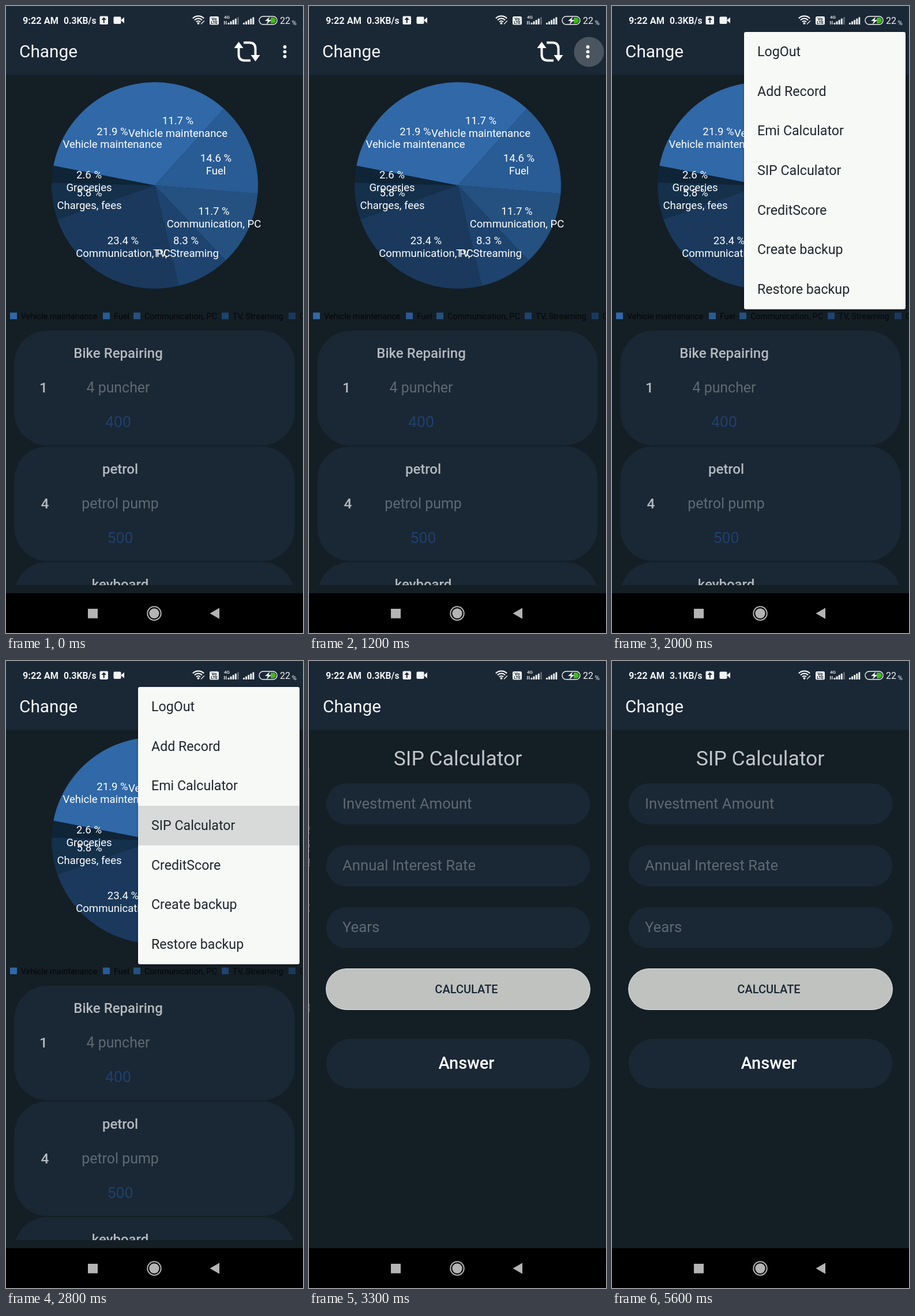
These frames come from a looping animation (515x1087 px, 5800 ms). An HTML page with a canvas:

```html
<!DOCTYPE html>
<html lang="en">
<head>
<meta charset="utf-8">
<title>Calculator menu</title>
<style>
html, body { margin: 0; width: 100%; height: 100%; overflow: hidden; background: #000; }
canvas { display: block; }
</style>
</head>
<body>
<canvas id="stage" width="515" height="1087"></canvas>
<script>
const W = 515, H = 1087, LOOP = 5800, STEP = 100;
const PAGE_BOTTOM = 1018, LIST_BOTTOM = 1004;
const DP = W / 360;
const BG = '#141e25', PANEL = '#1a2735', HINT = '#5f6972', HEADING = '#b5babf';
const ctx = document.getElementById('stage').getContext('2d');

const SLICES = [
  [33.6, '#3068a8'], [14.6, '#295b94'], [11.7, '#24517f'], [8.3, '#1e436e'],
  [23.4, '#1a395c'], [5.8, '#14304b'], [2.6, '#0f2437']
];
const LABELS = [
  ['11.7 %', 'Vehicle maintenance', 298, 198], ['21.9 %', 'Vehicle maintenance', 184.5, 217],
  ['14.6 %', 'Fuel', 364, 263], ['11.7 %', 'Communication, PC', 360.5, 355],
  ['8.3 %', 'TV, Streaming', 312, 406], ['23.4 %', 'Communication, PC', 203, 406],
  ['5.8 %', 'Charges, fees', 144.5, 323], ['2.6 %', 'Groceries', 144, 292]
];
const LEGEND = [
  ['Vehicle maintenance', 7], ['Fuel', 168], ['Communication, PC', 221],
  ['TV, Streaming', 374], ['Communication, PC', 490]
];
const RECORDS = [
  ['1', 'Bike Repairing', '4 puncher', '400', 65, 194.5],
  ['4', 'petrol', 'petrol pump', '500', 67.5, 198],
  ['5', 'keyboard', '', '', 67.5, 198]
];
const MENU = ['LogOut', 'Add Record', 'Emi Calculator', 'SIP Calculator', 'CreditScore',
  'Create backup', 'Restore backup'];

const clamp = v => Math.max(0, Math.min(1, v));
const span = (t, a, b) => clamp((t - a) / (b - a));

function text(str, x, y, size, color, align = 'left', weight = 400) {
  ctx.font = `${weight} ${size}px Roboto, sans-serif`;
  ctx.textAlign = align;
  ctx.fillStyle = color;
  ctx.fillText(str, x, y);
}

function rect(x, y, w, h, color) {
  ctx.fillStyle = color;
  ctx.fillRect(x, y, w, h);
}

function pill(x, y, w, h, r, fill, stroke) {
  ctx.beginPath();
  ctx.roundRect(x, y, w, h, r);
  if (fill) { ctx.fillStyle = fill; ctx.fill(); }
  if (stroke) { ctx.strokeStyle = stroke; ctx.stroke(); }
}

function disc(x, y, r, color) {
  ctx.beginPath();
  ctx.arc(x, y, r, 0, Math.PI * 2);
  ctx.fillStyle = color;
  ctx.fill();
}

function poly(points, color) {
  ctx.beginPath();
  for (let i = 0; i < points.length; i += 2) ctx.lineTo(points[i], points[i + 1]);
  ctx.closePath();
  ctx.fillStyle = color;
  ctx.fill();
}

function clipped(x, y, w, h, draw) {
  ctx.save();
  ctx.beginPath();
  ctx.rect(x, y, w, h);
  ctx.clip();
  draw();
  ctx.restore();
}

function pageBase() {
  rect(0, 0, W, PAGE_BOTTOM, BG);
  rect(0, 0, W, 119.5, PANEL);
  text('Change', 23, 89, 29.8, '#f6f8f9');
}

function refreshIcon() {
  ctx.strokeStyle = '#fff';
  ctx.lineWidth = 4;
  for (const turn of [0, Math.PI]) {
    ctx.save();
    ctx.translate(418, 79);
    ctx.rotate(turn);
    ctx.beginPath();
    ctx.moveTo(-14.5, -8);
    ctx.lineTo(-14.5, 5);
    ctx.quadraticCurveTo(-14.5, 15.5, -4, 15.5);
    ctx.lineTo(6, 15.5);
    ctx.stroke();
    poly([-22.5, -6, -14.5, -17, -6.5, -6], '#fff');
    ctx.restore();
  }
}

function pie() {
  const cx = 258, cy = 311, r = 179;
  let from = 190.9 * Math.PI / 180;
  for (const [share, color] of SLICES) {
    const to = from + share / 100 * Math.PI * 2;
    ctx.beginPath();
    ctx.moveTo(cx, cy);
    ctx.arc(cx, cy, r, from, to + 0.002);
    ctx.fillStyle = color;
    ctx.fill();
    from = to;
  }
  for (const [value, name, x, y] of LABELS) {
    text(value, x, y + 6.5, 13 * DP, '#fff', 'center');
    text(name, x, y + 28.5, 13 * DP, '#fff', 'center');
  }
}

function legend() {
  LEGEND.forEach(([name, x], i) => {
    rect(x, 531.5, 12, 11.5, SLICES[i][1]);
    text(name, x + 19, 543, 10 * DP, '#04080b');
  });
}

function records() {
  RECORDS.forEach(([id, name, note, sum, idX, x], i) => {
    const y = 563 + i * 200.5;
    pill(10 * DP, y, 340 * DP, 198.5, 40 * DP, PANEL);
    text(id, idX, y + 107, 24.5, HEADING, 'center', 500);
    text(name, x, y + 47, 24, HEADING, 'center', 500);
    text(note, x, y + 107, 24.9, HINT, 'center');
    text(sum, x, y + 167, 26.6, '#1e416c', 'center');
  });
}

function homePage(ripple) {
  pageBase();
  refreshIcon();
  if (ripple) disc(485.5, 79.5, 26, `rgba(255,255,255,${0.21 * ripple})`);
  for (const y of [71, 79.3, 87.6]) disc(483.5, y, 2.9, '#fff');
  pie();
  legend();
  clipped(0, 555, W, LIST_BOTTOM - 555, records);
}

function menu(open, alpha, picked) {
  const x = 229, y = 45, w = 280, row = 48 * DP, h = row * MENU.length;
  const cw = w * (0.4 + 0.6 * open), ch = h * open;
  ctx.save();
  ctx.globalAlpha = alpha;
  clipped(x + w - cw - 4, y - 4, cw + 8, ch + 8, () => {
    ctx.save();
    ctx.shadowColor = 'rgba(0,0,0,.35)';
    ctx.shadowBlur = 4;
    ctx.shadowOffsetY = 1;
    pill(x + w - cw, y, cw, ch, 3, '#f7f9f7');
    ctx.restore();
    if (picked) rect(x, y + 3 * row, w, row, '#d7dad9');
    clipped(x + w - cw, y, cw, ch, () => {
      MENU.forEach((item, i) => text(item, 252, 87 + i * row, 23.2, '#20262c'));
    });
  });
  ctx.restore();
}

function calcPage() {
  const x = 20 * DP, w = 320 * DP, h = 50 * DP;
  pageBase();
  text('SIP Calculator', 257, 181, 35.5, '#c0c6ca', 'center');
  ['Investment Amount', 'Annual Interest Rate', 'Years'].forEach((hint, i) => {
    const y = 212 + i * 75 * DP;
    pill(x, y, w, h, h / 2, PANEL);
    text(hint, 57, y + 43.5, 25.7, HINT);
  });
  ctx.lineWidth = 1;
  pill(x, 533.5, w, 71, 35.5, '#c0c2bf', '#e9ecec');
  text('CALCULATE', 272, 576, 20, '#1a2735', 'center', 500);
  pill(x, 655, w, 60 * DP, 30 * DP, PANEL);
  text('Answer', 272, 707, 29, '#fff', 'center', 500);
}

function bars(x, n, lit) {
  for (let i = 0; i < n; i++) {
    const h = 3 + i * 2.4;
    rect(x + i * 4.1, 32 - h, 2.9, h, i < lit ? '#eef1f2' : '#5d6871');
  }
}

function statusBar(speed) {
  const ink = '#f1f3f4';
  text('9:22 AM', 29, 31, 16.3, ink, 'left', 700);
  text(speed, 100, 31, 15.7, ink, 'left', 700);

  pill(162.5, 17.5, 14.5, 14.5, 2, ink);
  poly([169.7, 19.5, 174, 24, 170.7, 24, 170.7, 29.5, 168.7, 29.5, 168.7, 24, 165.4, 24], PANEL);
  pill(186.5, 18.5, 13, 12.5, 2, ink);
  poly([199, 24.7, 205, 19.5, 205, 30], ink);

  ctx.strokeStyle = ink;
  ctx.lineWidth = 2.2;
  for (const r of [5, 9.3, 13.6]) {
    ctx.beginPath();
    ctx.arc(333.5, 31, r, -Math.PI * 0.75, -Math.PI * 0.25);
    ctx.stroke();
  }
  disc(333.5, 30, 2, ink);
  ctx.lineWidth = 1.3;
  ctx.beginPath();
  ctx.moveTo(338, 31.5);
  ctx.lineTo(344, 25.5);
  ctx.stroke();

  pill(353, 18, 16, 14.5, 2.5, ink);
  text('Vo', 361, 24.8, 7.5, PANEL, 'center', 700);
  text('LTE', 361, 31.3, 7, PANEL, 'center', 700);

  text('4G', 378, 21.5, 8, ink, 'left', 500);
  rect(378, 26, 1.3, 6, ink);
  rect(381, 26, 1.3, 6, ink);
  bars(384.5, 5, 4);
  bars(411, 5, 5);

  ctx.lineWidth = 1.4;
  pill(439, 18, 31, 14, 7, null, ink);
  pill(459, 20, 9, 10, [0, 5, 5, 0], '#43b81f');
  poly([457.5, 18.5, 449, 26, 454, 26, 451.5, 32, 460.5, 24, 455.3, 24], ink);
  text('22', 475, 31, 16, ink);
  text('%', 495.5, 32.5, 11.5, ink);
}

function navBar() {
  const ink = '#b4b4b4';
  rect(0, PAGE_BOTTOM, W, H - PAGE_BOTTOM, '#000');
  rect(142, 1045, 17, 16.5, ink);
  ctx.strokeStyle = ink;
  ctx.lineWidth = 2;
  ctx.beginPath();
  ctx.arc(257, 1053, 11.7, 0, Math.PI * 2);
  ctx.stroke();
  disc(257, 1053, 8.7, ink);
  poly([353.5, 1053, 370, 1043.5, 370, 1062.5], ink);
}

// Critically damped spring: distance left to travel, from 1 to 0.
function spring(ms) {
  const k = Math.max(0, ms) * 0.0207;
  return (1 + k) * Math.exp(-k);
}

function draw(t) {
  const left = spring(t - 2909);
  const x = Math.round(W * left);

  if (x > 0) {
    ctx.save();
    ctx.translate(-Math.round((W - x) / 4), 0);
    homePage(span(t, 1000, 1200) * (1 - span(t, 1300, 1500)));
    ctx.restore();
    rect(0, 0, W, PAGE_BOTTOM, `rgba(0,0,0,${0.5 * (1 - left)})`);
  }
  if (x < W) {
    ctx.save();
    ctx.translate(x, 0);
    calcPage();
    ctx.restore();
  }
  statusBar(t < 3900 ? '0.3KB/s' : '3.1KB/s');
  if (t >= 1300 && t < 3000) {
    const open = 1 - (1 - span(t, 1200, 1500)) ** 2;
    menu(open, 1 - span(t, 2800, 3000), t >= 2800);
  }
  navBar();
}

function tick(now) {
  draw(Math.floor(now % LOOP / STEP) * STEP);
  requestAnimationFrame(tick);
}
requestAnimationFrame(tick);
</script>
</body>
</html>
```
